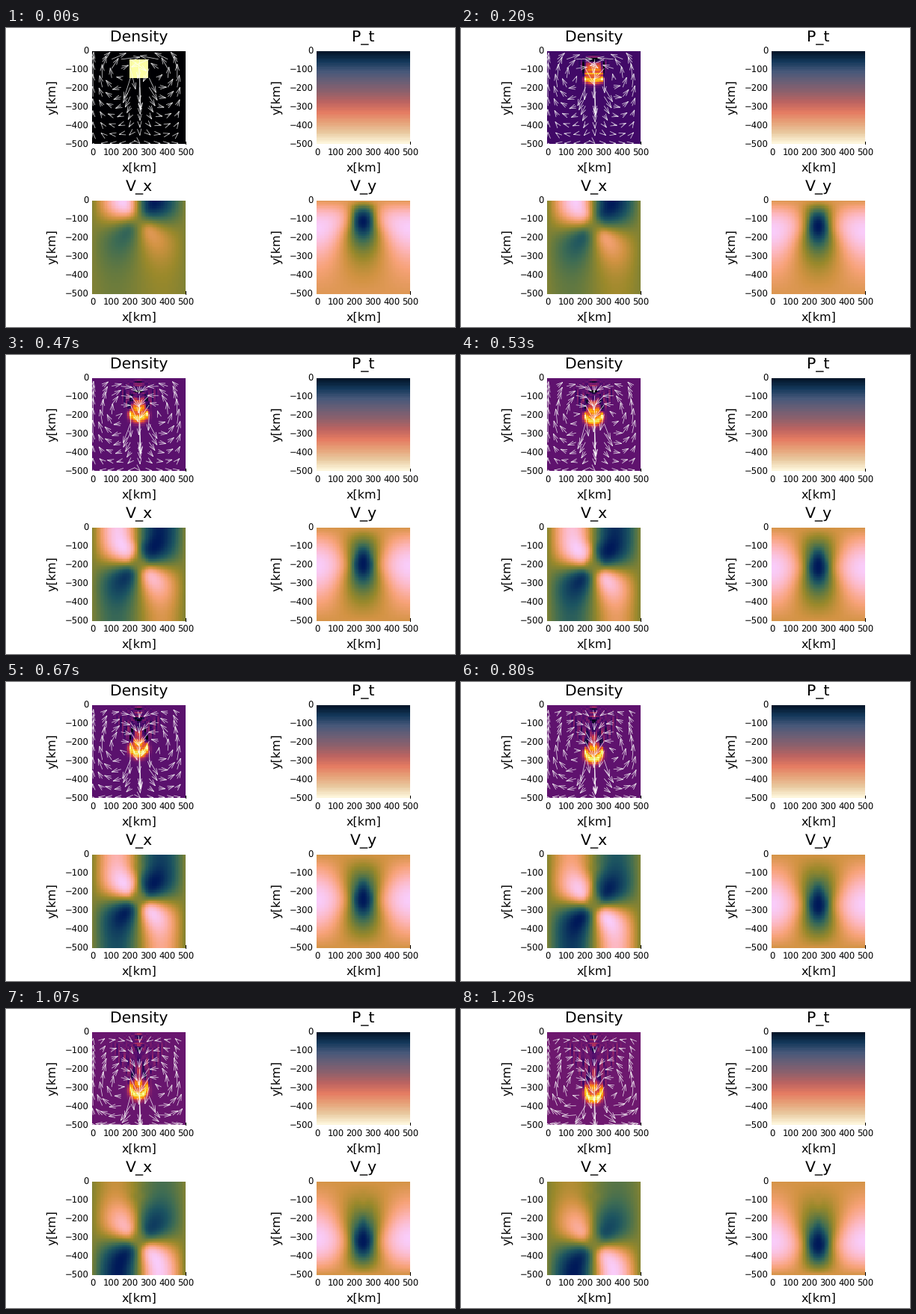
A matplotlib script that plays this animation: 600 by 400 pixels, repeating every 1.27 s.

```python
import numpy as np
import matplotlib.pyplot as plt
from matplotlib.animation import FuncAnimation
from matplotlib.collections import LineCollection
from matplotlib.colors import LinearSegmentedColormap

W, H, DPI = 600, 400, 100
PX = 72 / DPI                 # one pixel in points
N, SIZE = 50, 500.0           # cells per side, box size in km
CELL = SIZE / N
KM_PER_PX = 4.0
STATES, SUBSTEPS = 19, 6
TICK_MS, LOOP_MS = 10, 1270

plt.rcParams["font.family"] = "DejaVu Sans"
plt.rcParams["text.hinting"] = "none"

BATLOW = LinearSegmentedColormap.from_list("batlow", [
    "#001959", "#0F3B5F", "#1D5561", "#3E6C54", "#687B3E",
    "#9A892B", "#D29343", "#F7A278", "#FDB6BC", "#F9CCF9"])
LIPARI = LinearSegmentedColormap.from_list("lipari", [
    "#031326", "#13385A", "#47587A", "#6B5F76", "#8E616C",
    "#BC6461", "#E57B62", "#E7A279", "#E9C99F", "#FDF5DA"])

# depth of the block's lower edge (km) and colour level of the background
KEYS = [0, 3, 5, 8, 10, 14, 18]
FRONT = np.interp(range(STATES), KEYS, [150, 187, 217, 267, 296, 356, 393])
LEVEL = np.interp(range(STATES), [0, 1] + KEYS[1:],
                  [0, 0.15, 0.20, 0.235, 0.27, 0.26, 0.285, 0.305])

# --- Stokes flow with free-slip walls, solved in sine modes ---
mode = np.arange(1, N)
SINES = np.sin(np.pi * np.outer(mode, mode) / N)
EIGEN = (2 / CELL * np.sin(np.pi * mode / (2 * N))) ** 2
BIHARMONIC = (EIGEN[:, None] + EIGEN[None, :]) ** 2


def flow(rho):
    """Velocities on the cell faces: u to the right, w downwards."""
    slope = np.diff(rho, axis=1) / CELL
    slope = (slope[1:] + slope[:-1]) / 2
    psi = np.zeros((N + 1, N + 1))
    modes = SINES @ slope @ SINES / BIHARMONIC
    psi[1:-1, 1:-1] = (2 / N) ** 2 * SINES @ modes @ SINES
    return np.diff(psi, axis=0) / CELL, -np.diff(psi, axis=1) / CELL


def rate(rho, u, w):
    """Central-difference advection."""
    p = np.pad(rho, 1, mode="edge")
    fx = u * (p[1:-1, 1:] + p[1:-1, :-1]) / 2
    fz = w * (p[1:, 1:-1] + p[:-1, 1:-1]) / 2
    return -(np.diff(fx, axis=1) + np.diff(fz, axis=0)) / CELL


def advect(rho, u, w, dt):
    a = rate(rho, u, w)
    b = rate(rho + dt / 2 * a, u, w)
    c = rate(rho + dt / 2 * b, u, w)
    d = rate(rho + dt * c, u, w)
    return rho + dt / 6 * (a + 2 * b + 2 * c + d)


def snapshot(rho):
    u, w = flow(rho)
    return rho, (u[:, 1:] + u[:, :-1]) / 2, (w[1:] + w[:-1]) / 2


def simulate():
    rho = np.zeros((N, N))
    rho[5:15, 20:30] = 1
    states = [snapshot(rho)]
    faces = np.arange(N + 1) * CELL
    for top, bottom in zip(FRONT[:-1], FRONT[1:]):
        step = (bottom - top) / SUBSTEPS
        for i in range(SUBSTEPS):
            u, w = flow(rho)
            axis_speed = w[:, N // 2 - 1:N // 2 + 1].mean(axis=1)
            speed = np.interp(top + (i + 0.5) * step, faces, axis_speed)
            rho = advect(rho, u, w, step / speed)
        states.append(snapshot(rho))
    return states


STATE = simulate()
START = np.round(np.arange(STATES) * 100 / 15) * 10

# --- figure ---
fig = plt.figure(figsize=(W / DPI, H / DPI), dpi=DPI, facecolor="white")


def label(x, y, text, size, **kw):
    fig.text(x / W, 1 - y / H, text, fontsize=size, va="baseline", **kw)


def panel(x, y, title, cmap):
    side = SIZE / KM_PER_PX
    ax = fig.add_axes([x / W, 1 - (y + side) / H, side / W, side / H])
    image = ax.imshow(np.zeros((N, N)), cmap=cmap, interpolation="nearest",
                      extent=(0, SIZE, -SIZE, 0), aspect="auto")
    ax.set(xticks=[], yticks=[], xlim=(0, SIZE), ylim=(-SIZE, 0))
    ax.spines[:].set_visible(False)
    ax.plot([SIZE, SIZE], [-SIZE, -SIZE + 14], color="black", lw=PX,
            clip_on=False)

    mid = x + side / 2
    label(mid, y - 12.5, title, 14.7, ha="center")
    label(mid, y + 161, "x[km]", 11.5, ha="center")
    label(x - 49, y + side / 2, "y[km]", 11.5, ha="center",
          rotation=90, rotation_mode="anchor")
    for km in range(0, 501, 100):
        offset = km / KM_PER_PX
        label(x + offset + 0.5, y + 140.7, str(km), 8.4, ha="center")
        label(x - 4, y + offset + 4.5, f"\u2212{km}" if km else "0", 8.4,
              ha="right")
    return ax, image


density_ax, density = panel(115, 30.5, "Density", "inferno")
pressure = panel(415, 30.5, "P_t", LIPARI)[1]
vel_x = panel(115, 230.5, "V_x", BATLOW)[1]
vel_y = panel(415, 230.5, "V_y", BATLOW)[1]

pressure.set_data(np.repeat(np.linspace(0, 1, N)[:, None], N, axis=1))
pressure.set_clim(0, 1)

arrows = LineCollection([], colors="white", linewidths=0.8 * PX, alpha=0.8)
density_ax.add_collection(arrows, autolim=False)

centre = (np.arange(N) + 0.5) * CELL
TAIL_X, TAIL_Y = np.meshgrid(centre[::5], -centre[4::5])
MAX_ARROW, HEAD, SPREAD = 46 * KM_PER_PX, 9 * KM_PER_PX, 0.3


def arrow_lines(u, w):
    """Shaft and the two barbs of every arrow as separate strokes."""
    scale = MAX_ARROW / np.hypot(u, w).max()
    tail = (TAIL_X + 1j * TAIL_Y).ravel()
    shaft = scale * (u - 1j * w)[4::5, ::5].ravel()
    tip = tail + shaft
    back = -HEAD * np.exp(1j * np.angle(shaft))
    ends = [tail] + [tip + back * np.exp(1j * a) for a in (SPREAD, -SPREAD)]
    strokes = np.concatenate([np.stack([e, tip], axis=1) for e in ends])
    return np.stack([strokes.real, strokes.imag], axis=2)


def show(image, data):
    image.set_data(data)
    image.set_clim(data.min(), data.max())


def update(tick):
    k = np.searchsorted(START, tick * TICK_MS, side="right") - 1
    rho, u, w = STATE[k]
    show(vel_x, u)
    show(vel_y, -w)
    density.set_data(rho)
    density.set_clim(-LEVEL[k] / (1 - LEVEL[k]) * rho.max(), rho.max())
    arrows.set_segments(arrow_lines(u, w))
    return density, vel_x, vel_y, arrows


anim = FuncAnimation(fig, update, frames=LOOP_MS // TICK_MS, interval=TICK_MS,
                     repeat=True, repeat_delay=0, blit=False)
plt.show()
```
